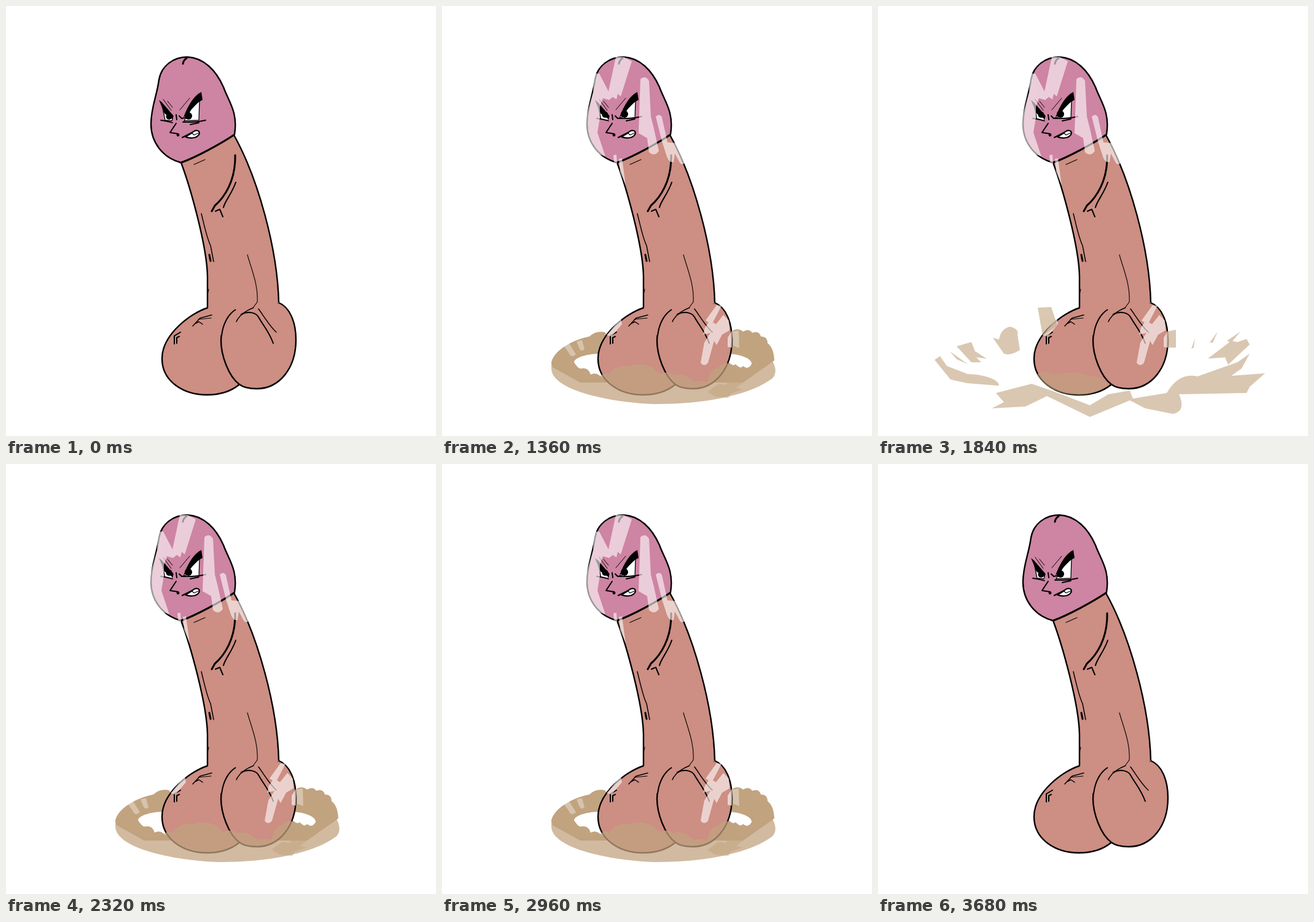
An HTML page that plays this animation: 700x700 px, repeating every 3760 ms.

```html
<!DOCTYPE html>
<html lang="en">
<head>
<meta charset="utf-8">
<title>Angry cartoon</title>
<style>
html, body { margin: 0; width: 100%; height: 100%; overflow: hidden; background: #fff; }
svg { display: block; width: 100vw; height: 100vh; }
.line { fill: none; stroke: #000; stroke-linecap: round; stroke-linejoin: round; }
.skin { fill: #cd8e83; }
.head { fill: #ce84a3; }
.dust { fill: #c1a37f; }
</style>
</head>
<body>
<svg viewBox="0 0 700 700">
  <g id="ringBack" class="dust">
    <path fill-rule="evenodd" d="M178 580C184 556 222 541 240 538Q250 528 265 531L275 545H465L472 529Q482 523 490 530Q500 524 505 532Q516 528 519 538Q530 538 530 549Q540 556 541 577L490 613H225L180 588Z
      M258 566C235 566 215 573 215 580Q222 592 228 590Q238 588 242 600Q252 595 260 605L468 581Q474 587 478 583Q486 592 490 586Q498 593 504 583C505 575 490 568 468 566Z"/>
    <path fill="#fff" opacity=".35" d="M198 553L207 549L218 567Q210 574 206 564ZM219 546L228 544L232 559Q226 564 223 556ZM473 530L483 528L484 557L474 553Z"/>
  </g>

  <g stroke="#000" stroke-width="2.4" stroke-linejoin="round" class="skin">
    <path d="M329 491C300 500 254 535 254 574C254 612 290 633 327 633C350 633 368 626 380 616L400 520Z"/>
    <path d="M444 483C462 490 472 515 472 543C472 590 445 623 408 623C395 623 385 620 380 616C362 603 350 568 350 545C350 520 362 500 375 493Z"/>
    <path stroke="none" d="M328 489L340 540L351 535C353 515 362 503 375 493L400 520L443 483L420 470H330Z"/>
    <path stroke="none" d="M285 255C300 295 327 390 328 440V491L375 495L444 484C442 395 410 280 371 210Z"/>
    <path fill="none" d="M285 255C300 295 327 390 328 440V491M371 210C410 280 442 395 444 483"/>
    <path fill="none" stroke-width="2" d="M374 494C361 502 353 518 351 537"/>
    <path class="head" d="M285 255C255 247 236 222 236 192C236 165 246 145 249 120C253 97 273 83 295 83C322 84 342 105 354 132C362 155 378 172 372 209C350 224 310 246 285 255Z"/>
  </g>

  <g class="line">
    <path stroke-width="3" d="M294 85Q289 88 288 94M285 255C310 246 350 224 371 210M373 243C374 285 355 312 340 325L335 334M331 405L333 415"/>
    <path stroke-width="2" d="M374 287C368 305 356 318 354 328M341 334L348 331L353 343M274 550V537L284 531M278 549V540L282 538M383 502C395 496 408 499 412 508C420 522 428 530 435 549"/>
    <path stroke-width="1.5" d="M318 338C323 358 327 378 333 390L338 416M375 514C380 502 393 495 403 491M411 493C420 505 428 520 440 531M304 521L316 508L335 503M308 517L314 514L320 518"/>
    <path stroke-width="1.1" d="M306 258L324 250M393 405C400 430 411 455 409 482L403 490M330 461L328 470M313 510L334 508"/>
  </g>

  <g id="face">
    <g fill="#fff" stroke="#000" stroke-width="1.3">
      <path d="M255 166L272 179L270 187L259 186Z"/>
      <path d="M315 154L314 186L290 187L300 169Z"/>
    </g>
    <g id="pupils">
      <circle cx="265.5" cy="180" r="5"/>
      <circle cx="297" cy="179" r="6"/>
    </g>
    <g id="lidL">
      <path class="head" d="M252 187L271 188V194H256Z"/>
      <path class="line" stroke-width="1.8" d="M252 186Q262 187 271 190"/>
    </g>
    <g id="lidR">
      <path class="head" d="M289 188Q305 189 319 186V195H289Z"/>
      <path class="line" stroke-width="1.8" d="M288 189Q305 190 325 186M300 193L314 190"/>
    </g>
    <path d="M318 140C306 146 297 160 289 181L298 175C303 165 312 156 320 153ZM249 153L254 157L272 178L271 184L258 175Z"/>
    <path class="line" stroke-width="2" d="M277 191L267 206L280 208M277 177L278 185M282 179L286 183L291 182"/>
    <circle cx="280" cy="210" r="2.4"/>
    <path class="line" stroke-width="1" d="M299 150L283 169M256 152L269 170M263 155L271 165"/>
    <path class="line" stroke-width="2.2" d="M287 214L303 206"/>
    <path fill="#fff" stroke="#000" stroke-width="2.2" stroke-linejoin="round" d="M292 213L302 207Q309 200 314 204Q317 210 308 214Q300 216 292 213Z"/>
    <path class="line" stroke-width="1.2" d="M303 207L306 210L313 207"/>
  </g>

  <g id="shine" fill="#fff" opacity=".6">
    <path d="M283 83H296L309 90L291 147L286 143L284 152L278 148L272 153L262 150L257 164L257 182L253 206L266 245L240 235L232 190L246 140L247 110L256 110L271 139Z"/>
    <path d="M323 119Q331 112 337 122L340 180L345 200L353 236Q346 246 337 238L334 215L320 207Z"/>
    <path d="M348 180Q354 174 358 181L367 222L380 223L396 255Q390 261 386 253L379 240L377 254Q370 256 366 245L358 220Z"/>
    <path d="M279 243L284 242L285 257L280 254ZM288 249L293 248L299 292L290 270Z"/>
    <path d="M447 487L455 488L441 515L446 518L458 503L467 512L468 528L456 535L447 552L443 545L433 581Q427 588 421 581L427 548L437 532L425 535L428 524L434 515L429 512ZM465 540L473 527L472 556L465 555Z"/>
    <path d="M268 536L291 508L293 518L276 538Z"/>
  </g>

  <g id="ringFront" class="dust">
    <path opacity=".74" d="M178 580L218 605Q235 614 258 602Q265 595 272 600Q285 582 302 587Q325 578 345 590Q352 600 358 598Q370 594 375 601Q392 595 410 612Q425 608 432 613Q436 590 450 588Q460 578 470 583L490 612L537 576Q548 595 538 606C500 635 420 649 345 648C270 645 178 625 178 590Z"/>
    <path opacity=".5" d="M432 628L450 615L461 617L467 610L491 612L479 622L490 624L470 631L466 638L445 636Z"/>
  </g>

  <g id="splash" class="dust" opacity=".6">
    <path d="M92 576L101 570L112 586L146 599Q175 600 192 610Q200 618 195 618L145 614L118 608Z"/>
    <path d="M117 562L146 583L128 575ZM128 554L152 547L158 562L177 574L160 572L168 580H152ZM187 540L197 543Q200 525 215 522Q230 526 227 535L231 560Q215 570 205 566Z"/>
    <path d="M260 491L282 490L292 520L268 537ZM470 530L485 527V556H470ZM510 558L516 541L514 556ZM540 548L553 530L545 548ZM568 545L590 530L575 548Z"/>
    <path d="M537 574L575 545L585 547L600 542L605 551L570 584L565 572Z"/>
    <path d="M415 639L470 630Q490 596 520 603L585 580L605 566L592 590L575 602L630 598L605 620L600 630L490 632Q502 660 480 664L435 655L410 642L345 669L275 635L240 652L185 655L205 645L192 630L250 615L285 627L345 650L375 632L410 626Z"/>
    <path d="M258 600Q270 592 290 600Q320 592 345 602Q365 602 375 617Q355 633 327 633Q280 633 258 600Z"/>
  </g>
</svg>
<script>
const LOOP = 3760, STEP = 80;
const SQUINT = 400, POWER = 960, CALM = 3680;
const el = id => document.getElementById(id);
const show = (id, on) => el(id).setAttribute('display', on ? 'inline' : 'none');
const move = (id, value) => el(id).setAttribute('transform', value);

// Dust cycle: small ring, ring, wide ring, splash.
const ringScale = ['.8 .8', '1 1', '1.33 1.46'];
const ringAlpha = [1, 1, .8];

function draw(t) {
  const calm = t >= CALM;
  const squint = calm || t < SQUINT ? 0 : Math.min(7, Math.floor((t - SQUINT) / STEP) + 1);
  move('lidL', `translate(0 ${-3 * squint / 7})`);
  move('lidR', `translate(0 ${-6 * squint / 7})`);
  move('pupils', `translate(0 ${-3 * squint / 7})`);
  move('face', `translate(${squint < 7 && squint % 2 ? 1 : 0} 0)`);

  const step = Math.floor((t - POWER) / STEP);
  const power = step >= 0 && !calm;
  show('shine', power);
  move('shine', step % 2 ? '' : 'translate(8 6)');

  const phase = step % 4, dust = power && step >= 4;
  show('splash', dust && phase === 3);
  for (const id of ['ringBack', 'ringFront']) {
    show(id, dust && phase < 3);
    if (dust && phase < 3) {
      move(id, `translate(360 590) scale(${ringScale[phase]}) translate(-360 -590)`);
      el(id).setAttribute('opacity', ringAlpha[phase]);
    }
  }
}

const start = performance.now();
function tick() {
  draw((performance.now() - start) % LOOP);
  requestAnimationFrame(tick);
}
tick();
</script>
</body>
</html>
```
